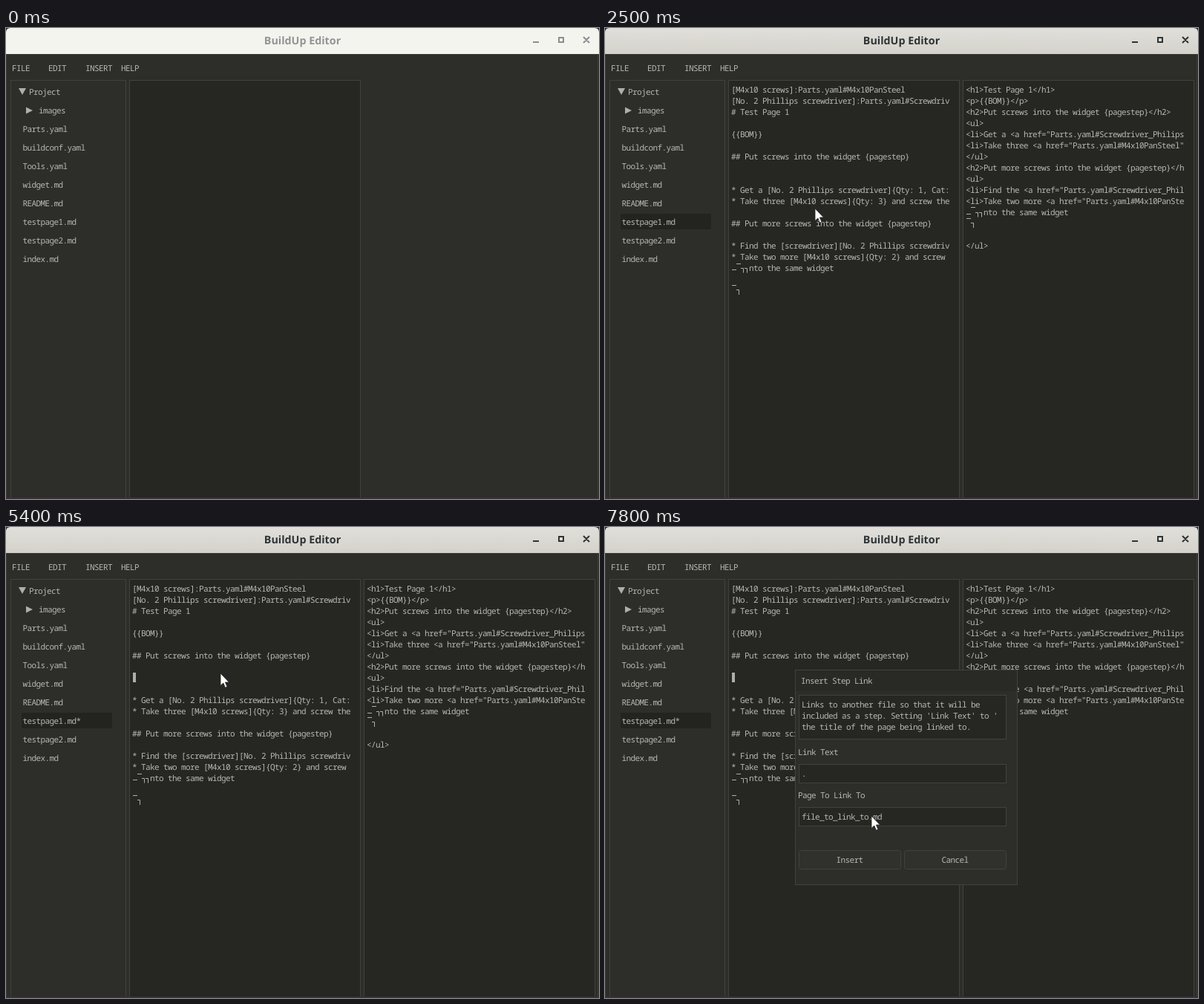
Animation, 799 px wide and 634 px high, one loop 8000 ms. Source, as an HTML page:

```html
<!DOCTYPE html>
<html lang="en">
<head>
<meta charset="utf-8">
<title>BuildUp Editor</title>
<style>
  html, body { margin: 0; width: 100%; height: 100%; overflow: hidden; background: #2d2d29; }
  svg { display: block; width: 799px; height: 634px; }
  text {
    font: 11px "Noto Sans Mono", "DejaVu Sans Mono", monospace;
    letter-spacing: -.6px;
    text-rendering: geometricPrecision;
    fill: #b8b8b2;
    white-space: pre;
  }
  .title { font: bold 14.3px "Noto Sans", "Open Sans", sans-serif; letter-spacing: 0; text-anchor: middle; }
  .frame { stroke: #41423d; }
  .mark { fill: none; stroke: #b0b0aa; }
  .solid { fill: #afafa9; }
</style>
</head>
<body>
<svg id="stage" viewBox="0 0 799 634" xmlns="http://www.w3.org/2000/svg">
  <defs>
    <linearGradient id="focused" x1="0" y1="0" x2="0" y2="1">
      <stop offset="0" stop-color="#e1dfda"/>
      <stop offset="1" stop-color="#d5d2cb"/>
    </linearGradient>
  </defs>
</svg>
<script>
const LOOP = 8000;
const BG = "#2d2d29", PANEL = "#262622";
const stage = document.getElementById("stage");

function add(parent, tag, attrs = {}, content = "") {
  const el = document.createElementNS("http://www.w3.org/2000/svg", tag);
  for (const key in attrs) el.setAttribute(key, attrs[key]);
  if (content) el.textContent = content;
  return parent.appendChild(el);
}
const group = (parent = stage) => add(parent, "g");
const path = (parent, d, cls) => add(parent, "path", { d, class: cls });
// y is the middle of the text line
const label = (parent, x, y, s) => add(parent, "text", { x, y: y + 4 }, s);
const fillRect = (parent, x, y, width, height, fill) =>
  add(parent, "rect", { x, y, width, height, fill });
const frame = (parent, x1, y1, x2, y2, fill, rx = 0) =>
  add(parent, "rect", { x: x1 + .5, y: y1 + .5, width: x2 - x1, height: y2 - y1, rx, fill, class: "frame" });
const show = (el, on) => el.setAttribute("visibility", on ? "visible" : "hidden");

function codeLines(parent, x, first, lines) {
  lines.forEach((s, i) => s && label(parent, x, 83 + (first + i) * 15, s));
}

// Stray glyphs the editor shows at wrapped line breaks
function strayMarks(parent, x, y, over, gap) {
  path(parent, `M${x + 7} ${y + over}.5h6M${x + 1} ${y + 2}.5h6` +
    `M${x + 13} ${y}.5h3.5v6M${x + 18} ${y}.5h3.5v6` +
    `M${x + 1} ${y + gap}.5h6M${x + 7} ${y + gap + 6}.5h3.5v6.5`, "mark");
}

// Window and title bar
fillRect(stage, 0, 0, 799, 634, "#2b2a3a");
fillRect(stage, 0, 632, 799, 2, "#3b303a");
fillRect(stage, 0, 35, 799, 597, BG);
const bar = add(stage, "path", { d: "M0 35V6Q0 0 6 0H793Q799 0 799 6V35Z" });
const title = add(stage, "text", { x: 399.5, y: 22, class: "title" }, "BuildUp Editor");
const controls = add(stage, "path", {
  d: "M710 19H718M745 13H751V19H745ZM778 12L786 20M786 12L778 20",
  fill: "none", "stroke-width": 2
});
fillRect(stage, 0, 35, 1, 597, "#3d3d39");
fillRect(stage, 797, 35, 1, 597, "#3d3d39");
fillRect(stage, 0, 35, 799, 1, "#3a3a36");

[["FILE", 8], ["EDIT", 57], ["INSERT", 107], ["HELP", 155]]
  .forEach(([s, x]) => label(stage, x, 54, s));

// Project tree
frame(stage, 6, 70, 161, 640, BG);
const chosen = fillRect(stage, 21, 250, 122, 21, "#232320");
path(stage, "M17 81H27L22 90ZM27 106.500V115.500L36 111Z", "solid");
label(stage, 31, 86, "Project");
label(stage, 44, 111, "images");
["Parts.yaml", "buildconf.yaml", "Tools.yaml", "widget.md", "README.md",
 "testpage1.md", "testpage2.md", "index.md"]
  .forEach((s, i) => label(stage, 22.5, 136 + i * 25, s));
const edited = label(stage, 94.5, 261, "*");

// Markdown pane
frame(stage, 166, 70, 477, 640, PANEL);
const doc = group();
codeLines(doc, 170, 0, [
  "[M4x10 screws]:Parts.yaml#M4x10PanSteel",
  "[No. 2 Phillips screwdriver]:Parts.yaml#Screwdriv",
  "# Test Page 1", "", "{{BOM}}", "",
  "## Put screws into the widget {pagestep}"
]);
const caret = fillRect(doc, 171, 181, 4, 13, "#afafa9");
const tail = group(doc);
codeLines(tail, 170, 9, [
  "* Get a [No. 2 Phillips screwdriver]{Qty: 1, Cat:",
  "* Take three [M4x10 screws]{Qty: 3} and screw the", "",
  "## Put more screws into the widget {pagestep}", "",
  "* Find the [screwdriver][No. 2 Phillips screwdriv",
  "* Take two more [M4x10 screws]{Qty: 2} and screw",
  "    nto the same widget"
]);
strayMarks(tail, 170, 323, -6, 23);

// HTML pane
const html = group();
frame(html, 482, 70, 793, 640, PANEL);
codeLines(html, 486, 0, [
  "<h1>Test Page 1</h1>",
  "<p>{{BOM}}</p>",
  "<h2>Put screws into the widget {pagestep}</h2>",
  "<ul>",
  '<li>Get a <a href="Parts.yaml#Screwdriver_Philips',
  '<li>Take three <a href="Parts.yaml#M4x10PanSteel"',
  "</ul>",
  "<h2>Put more screws into the widget {pagestep}</h",
  "<ul>",
  '<li>Find the <a href="Parts.yaml#Screwdriver_Phil',
  '<li>Take two more <a href="Parts.yaml#M4x10PanSte',
  "    nto the same widget", "", "",
  "</ul>"
]);
strayMarks(html, 486, 248, -7, 8);
fillRect(stage, 0, 632, 799, 2, "#3b303a");

// Insert menu
const menu = group();
frame(menu, 104, 66, 223, 172, BG);
["BOM", "STEP LINK", "IMAGE"].forEach((s, i) => label(menu, 110.5, 86 + i * 34, s));

// Step link dialog
const dialog = group();
frame(dialog, 256, 192, 555, 481, BG);
fillRect(dialog, 257, 193, 298, 28, "#292925");
label(dialog, 264, 207, "Insert Step Link");
frame(dialog, 261, 226, 540, 285, PANEL);
["Links to another file so that it will be",
 "included as a step. Setting 'Link Text' to '",
 "the title of the page being linked to."]
  .forEach((s, i) => label(dialog, 265, 239 + i * 15, s));
[["Link Text", ".", 303], ["Page To Link To", "file_to_link_to.md", 361]].forEach(([name, value, y]) => {
  label(dialog, 260, y, name);
  frame(dialog, 261, y + 16, 540, y + 41, PANEL);
  label(dialog, 265, y + 29, value);
});
[["Insert", 261], ["Cancel", 403]].forEach(([s, x]) => {
  frame(dialog, x, 435, x + 137, 460, "#30302c", 3);
  label(dialog, x + 50.5, 448, s);
});

const pointer = add(stage, "path", {
  d: "M0 0V16.500L3.800 13L6.400 19.200L9 18L6.400 12H11.500Z",
  fill: "#fff", stroke: "#222", "stroke-width": .8
});

// Pointer path: time, x, y
const track = [
  [300, 162, 20], [600, 118, 150], [1000, 85, 257], [1400, 85, 257],
  [1800, 340, 325], [2000, 340, 325], [2200, 389, 409], [2500, 283, 243], [2600, 283, 243],
  [3000, 246, 166], [3200, 246, 177], [3300, 246, 177], [3500, 257, 192], [3800, 257, 192],
  [4100, 296, 204], [5300, 296, 204], [5400, 289, 197], [6000, 127, 54], [6400, 127, 54],
  [6800, 134, 114], [7100, 134, 114], [7200, 244, 186], [7300, 244, 186],
  [7600, 461, 395], [7800, 359, 389], [LOOP, 359, 389]
];

function pointerAt(t) {
  const i = Math.max(1, track.findIndex(p => p[0] > t));
  const [t0, x0, y0] = track[i - 1], [t1, x1, y1] = track[i];
  const k = Math.max(0, (t - t0) / (t1 - t0));
  return [x0 + (x1 - x0) * k, y0 + (y1 - y0) * k];
}

function draw(now) {
  const t = Math.floor(now % LOOP / 100) * 100; // screen refreshes ten times a second
  const open = t >= 1300, newline = t >= 4600;
  bar.setAttribute("fill", open ? "url(#focused)" : "#f4f4ef");
  title.style.fill = open ? "#2e3436" : "#929595";
  controls.setAttribute("stroke", open ? "#2e3436" : "#8b8e8f");
  for (const el of [chosen, doc, html]) show(el, open);
  show(caret, t >= 3700);
  caret.setAttribute("y", newline ? 196 : 181);
  tail.setAttribute("transform", `translate(0 ${newline ? 15 : 0})`);
  show(edited, t >= 4700);
  show(menu, t >= 6100 && t < 7000);
  show(dialog, t >= 7000);
  show(pointer, t >= 300);
  pointer.setAttribute("transform", `translate(${pointerAt(t).map(Math.round).join(" ")})`);
}

const start = performance.now();
function tick() {
  draw(performance.now() - start);
  requestAnimationFrame(tick);
}
tick();
</script>
</body>
</html>
```
